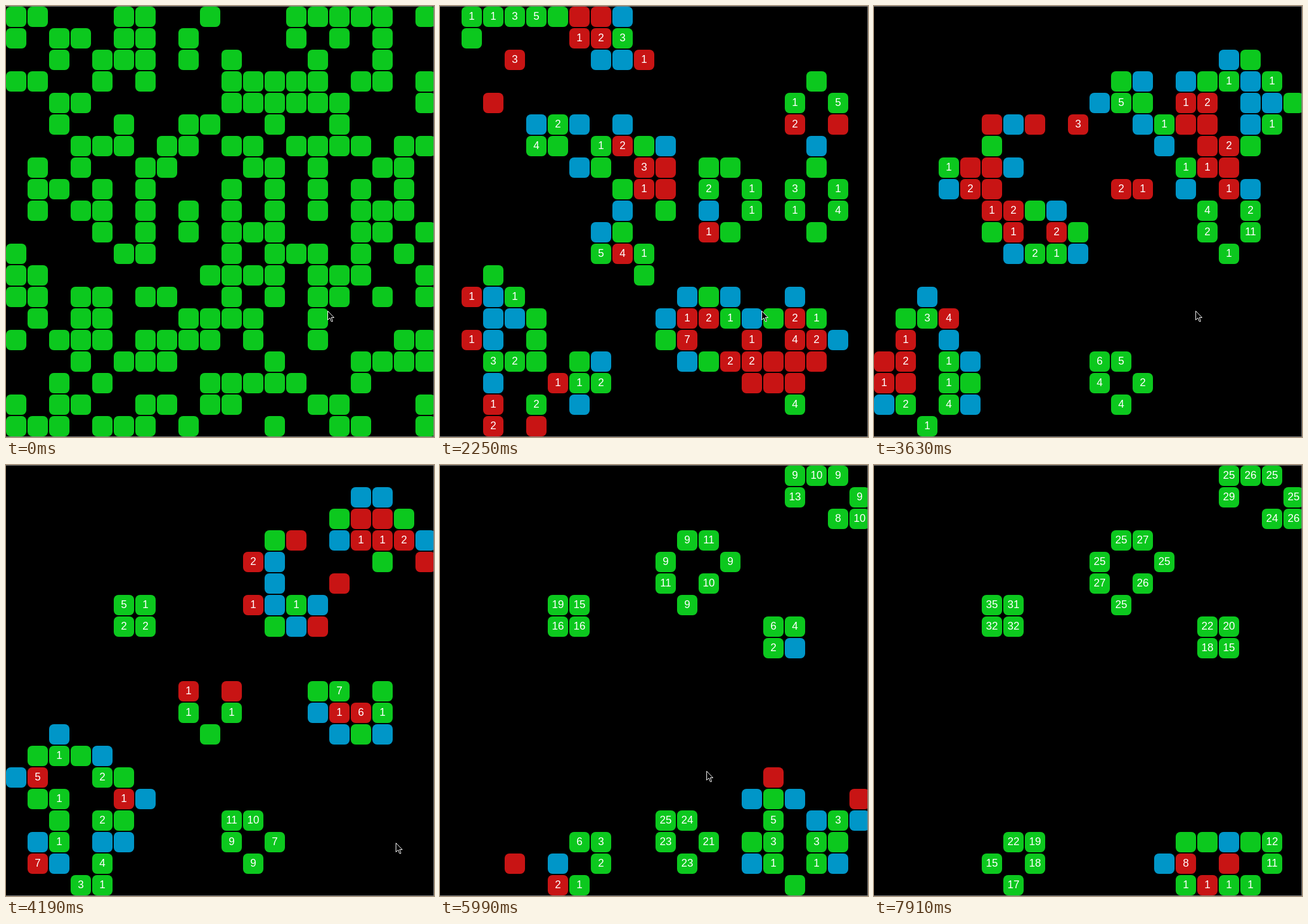
An HTML page with a canvas that plays this animation: 715x720 px, repeating every 8 s.

```html
<!DOCTYPE html>
<html lang="en">
<head>
<meta charset="utf-8">
<title>Game of Life</title>
<style>
  html, body { margin: 0; width: 100%; height: 100%; overflow: hidden; background: #000; }
  canvas { display: block; }
</style>
</head>
<body>
<canvas id="stage" width="715" height="720"></canvas>
<script>
const ctx = document.getElementById('stage').getContext('2d');
const W = 715, H = 720, LOOP = 8000;
const SIZE = 20, PITCH = 36, CELL = 34, RADIUS = 8;
const GREEN = '#0cc81e', RED = '#c81414', BLUE = '#0096c8', EDGE = '#808080';

const SEED = [
  '##...##..#...#####.#',
  '#.##.##.#....#.#.#..',
  '..#.###.#.#...#..#..',
  '##..#.#...#####.##.#',
  '..##......######...#',
  '..#..#..##..#..#....',
  '...###.##.##.####.##',
  '.#.#..##...##.#..##.',
  '.##.#.#...#.#.#.#.#.',
  '.#.##.#.#.#.#.#.###.',
  '....#.#.#.###...##.#',
  '#....##...#.###.#.#.',
  '##.......####.###..#',
  '##.##.##..#.#.##.#.#',
  '.#.##...####..#.....',
  '#.###.####.#..#...##',
  '...#.###....#...####',
  '..#.#....#####..#...',
  '#.##..##.##...##...#',
  '###.###.#...#..##..#'
];

// Moments at which each generation appears.
const BEATS = [
  1470, 1560, 1710, 1860, 2010, 2100, 2250, 2400, 2550, 2640, 2790, 2880,
  3030, 3180, 3280, 3380, 3480, 3630, 3720, 3810, 3980, 4080, 4190, 4330,
  4460, 4610, 4740, 4880, 4970, 5060, 5240, 5360, 5530, 5620, 5780, 5890,
  5990, 6110, 6210, 6320, 6430, 6540, 6650, 6770, 6880, 6990, 7110, 7260,
  7430, 7520, 7670, 7760, 7910
];

// Pointer waypoints: time, x, y.
const POINTER = [
  [3940, 537, 509], [4190, 651, 631], [4740, 620, 610], [5780, 620, 610],
  [5990, 445, 511], [6300, 450, 560], [6600, 470, 724]
];

// A cell holds its age, or -1 when dead.
const alive = (grid, x, y) =>
  x >= 0 && y >= 0 && x < SIZE && y < SIZE && grid[y][x] >= 0;

function survives(grid, x, y) {
  let count = 0;
  for (let dy = -1; dy <= 1; dy++)
    for (let dx = -1; dx <= 1; dx++)
      if ((dx || dy) && alive(grid, x + dx, y + dy)) count++;
  return count === 3 || (count === 2 && alive(grid, x, y));
}

const nextGrid = grid => grid.map((row, y) =>
  row.map((age, x) => survives(grid, x, y) ? age + 1 : -1));

const seedGrid = age => SEED.map(row => [...row].map(c => c === '#' ? age : -1));

const generations = [seedGrid(1)];
while (generations.length < BEATS.length)
  generations.push(nextGrid(generations[generations.length - 1]));

function drawCell(x, y, color, age) {
  const left = x * PITCH, top = y * PITCH + 1;
  ctx.fillStyle = color;
  ctx.beginPath();
  ctx.roundRect(left, top, CELL, CELL, RADIUS);
  ctx.fill();
  if (age > 0) {
    ctx.fillStyle = '#fff';
    ctx.fillText(age, left + CELL / 2, top + 22);
  }
}

function drawGrid(grid, marked) {
  grid.forEach((row, y) => row.forEach((age, x) => {
    const stays = !marked || survives(grid, x, y);
    if (age >= 0) drawCell(x, y, stays ? GREEN : RED, age);
    else if (marked && stays) drawCell(x, y, BLUE, 0);
  }));
}

function pointerAt(t) {
  const i = POINTER.findIndex(p => p[0] > t);
  if (i === 0) return POINTER[0].slice(1);
  if (i < 0) return null;
  const [t0, x0, y0] = POINTER[i - 1], [t1, x1, y1] = POINTER[i];
  const k = (t - t0) / (t1 - t0);
  return [Math.round(x0 + (x1 - x0) * k), Math.round(y0 + (y1 - y0) * k)];
}

const arrow = new Path2D('M.5 .5V15.5L4 12L6.5 18H8.5V16.5L6.5 11.5H11Z');

function drawPointer(t) {
  const at = pointerAt(t);
  if (!at) return;
  ctx.save();
  ctx.translate(...at);
  ctx.fillStyle = '#000';
  ctx.strokeStyle = '#fff';
  ctx.lineWidth = 1;
  ctx.fill(arrow);
  ctx.stroke(arrow);
  ctx.restore();
}

function drawEdges() {
  ctx.fillStyle = EDGE;
  ctx.fillRect(0, 0, W, 1);
  ctx.fillRect(W - 1, 0, 1, H);
  ctx.fillRect(0, H - 1, W, 1);
}

function render(t) {
  ctx.fillStyle = '#000';
  ctx.fillRect(0, 0, W, H);
  ctx.font = '18px "Liberation Sans", Arial, sans-serif';
  ctx.textAlign = 'center';
  const shown = BEATS.filter(beat => beat <= t).length;
  if (shown) drawGrid(generations[shown - 1], true);
  else drawGrid(seedGrid(0), false);
  drawPointer(t);
  drawEdges();
}

const start = performance.now();
function tick() {
  render((performance.now() - start) % LOOP);
  requestAnimationFrame(tick);
}
tick();
</script>
</body>
</html>
```
